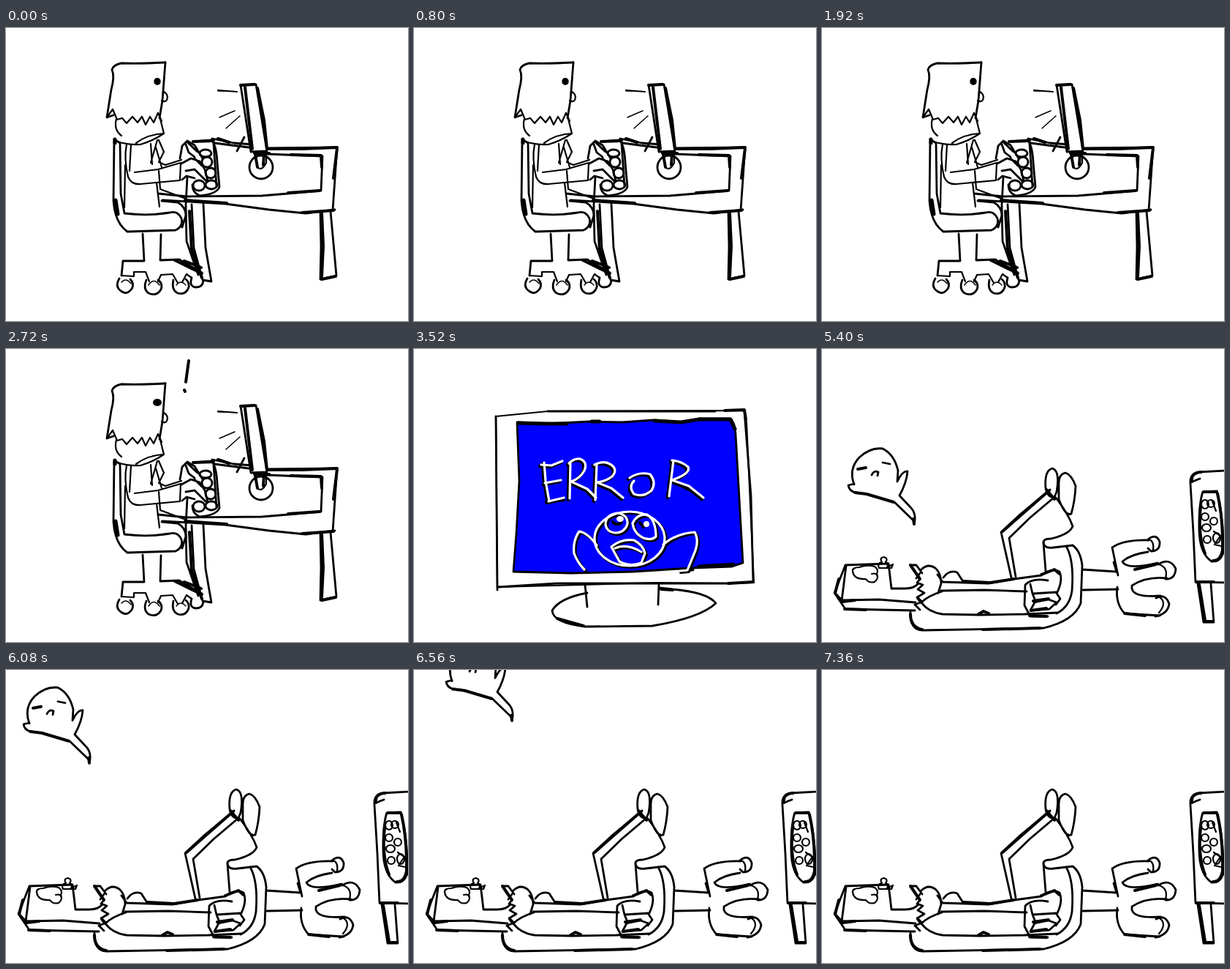
Animation, 550 px wide and 400 px high, one loop 7600 ms. Source, as an HTML page:

```html
<!DOCTYPE html>
<html lang="en">
<head>
<meta charset="utf-8">
<title>Error at the desk</title>
<style>
html, body { margin: 0; width: 100%; height: 100%; overflow: hidden; background: #fff; }
svg { display: block; width: 550px; height: 400px; }
.w1 { stroke-width: 1.5; }
.w2 { stroke-width: 2.2; }
.w4 { stroke-width: 4; }
.w5 { stroke-width: 5; }
.ink { fill: #000; stroke: none; }
.paper { fill: #fff; }
</style>
</head>
<body>
<svg viewBox="0 0 550 400" fill="none" stroke="#000" stroke-width="2.8" stroke-linecap="round" stroke-linejoin="round">
  <defs>
    <g id="letters">
      <path d="M178 155L180 180L185 208M174 158L188 159L203 153M179 183L201 179M184 208L205 203"/>
      <path d="M214 154L213 204M212 156Q219 149 227 150Q238 154 233 166Q227 177 215 181L237 191L249 203"/>
      <path d="M250 157L248 206M247 158Q258 152 268 157Q280 164 271 174Q262 181 250 182L270 190L286 203"/>
      <path d="M295 176Q308 167 323 171Q332 182 325 193Q314 203 301 198Q293 188 301 180"/>
      <path d="M355 152L349 201M353 152Q366 153 375 161Q379 170 353 179L376 187L396 203"/>
    </g>
    <g id="face">
      <ellipse cx="295" cy="259" rx="48" ry="37"/>
      <path d="M262 240Q262 226 278 224Q293 226 292 239Q288 251 275 251Q264 250 262 240Z"/>
      <path d="M299 238Q305 225 319 226Q331 234 331 256Q325 262 314 258Q301 252 299 238Z"/>
      <path d="M270 270Q283 259 301 261Q314 268 316 279L311 292Q295 298 281 290Z"/>
      <path d="M275 272Q291 265 311 277"/>
      <path d="M250 268Q238 251 226 249Q217 262 219 279Q224 292 233 301"/>
      <path d="M341 267Q358 252 384 250Q391 262 383 280L374 302L363 303"/>
    </g>
  </defs>

  <g id="desk">
    <!-- head -->
    <path d="M218 47Q182 49 158 48Q147 50 145 57Q149 66 144 84L138 122L147 119"/>
    <path d="M218 47Q216 73 214 99L210 123"/>
    <path class="w2" d="M138 122L146 111L152 125L159 123L165 130L173 121L180 129L186 121L191 132L197 121L202 129L208 116L213 127"/>
    <path class="w2" d="M216 87Q223 91 220 98Q218 102 213 99"/>
    <ellipse id="eye" class="ink" cx="207" cy="73" rx="4.7" ry="4.9"/>
    <path class="w2" d="M151 124Q147 139 158 147M211 124L216 144Q201 154 184 159Q168 160 152 155M216 144Q194 145 178 157"/>
    <!-- body -->
    <path class="w2" d="M165 159Q161 178 167 203Q171 214 184 213L238 208M171 159L169 195M163 187L162 245"/>
    <path class="w2" d="M176 197L208 193L239 184L238 208M207 153L198 184M198 158L200 186M209 153L216 169L209 183L218 187L240 180M205 163L213 190"/>
    <path class="w2" d="M206 211L210 244M209 195L211 220L246 233"/>
    <!-- chair -->
    <path d="M148 152L147 236Q149 266 166 278L232 276Q243 271 240 260Q235 249 224 252Q194 257 162 253L157 226L156 157L148 152"/>
    <path class="w5" d="M149 152V157M150 235L153 254"/>
    <path d="M213 236L235 238Q246 244 246 256L241 272"/>
    <path d="M187 281L189 318L160 318L158 338M212 282L211 317L237 316L268 334"/>
    <path class="w2" d="M158 338L175 339L175 333L191 333L196 346M208 346L212 337L228 336L235 348M241 347L247 336L254 341"/>
    <path class="w4" d="M231 317L268 335M244 318L267 327"/>
    <path d="M155 342Q149 352 156 358Q165 366 172 356Q176 349 170 343M192 344Q187 356 195 362Q206 367 212 357Q215 349 208 344M229 344Q226 358 235 362Q246 365 250 354Q251 347 246 343M254 341Q250 353 260 354Q269 354 270 345"/>
    <path class="w1" d="M158 347Q164 340 171 349M195 351Q202 340 210 351M233 351Q239 343 246 351"/>
    <!-- table -->
    <path d="M282 151L312 157L337 159M285 157L332 163M356 164L453 163L447 249"/>
    <path class="w4" d="M359 165L405 165L453 163M453 164L448 205M256 155L284 154M290 151L305 156"/>
    <path d="M357 172L433 175L431 222L386 226L350 229L247 230L208 226"/>
    <path class="w4" d="M390 173L431 174L432 190M386 225L429 222"/>
    <path d="M214 235L300 240L360 248L410 253L450 248"/>
    <path class="w4" d="M245 235L302 239M405 252L448 249"/>
    <path d="M248 204L246 241L247 291L263 337M254 241L257 300L269 344L281 346L273 300L270 240M430 250L431 298L430 343L452 338L444 250"/>
    <path class="w4" d="M251 250L254 302L268 341M432 252L434 298L432 339M432 343L451 339"/>
    <!-- screen -->
    <path class="paper" d="M321 78L342 77L357 168L335 169Z"/>
    <path class="w4" d="M321 78L340 77M327 81L337 165M344 82L353 126L357 165"/>
    <circle cx="349" cy="190" r="16"/>
    <path class="w4" d="M340 171H360M341 173L344 190M353 171L352 187"/>
    <path class="w2" d="M344 190Q350 196 356 184V172M290 85L316 87"/>
    <path class="w1" d="M292 122L313 113M301 137L320 120M290 86H302"/>
    <path d="M326 149L316 168"/>
    <!-- keys -->
    <path d="M258 155L281 153Q288 160 289 184L292 217Q288 227 265 229Q255 225 255 214M284 158L288 216"/>
    <ellipse cx="273" cy="171" rx="8" ry="5"/>
    <circle cx="275" cy="183" r="7"/>
    <circle cx="280" cy="198" r="7"/>
    <ellipse cx="264" cy="215" rx="8" ry="7"/>
    <ellipse cx="281" cy="214" rx="8" ry="6"/>
    <g id="handsA">
      <path d="M238 178L241 161L248 154L258 160L269 178M246 159L250 170L258 176M247 155L262 169"/>
      <path d="M240 185L253 178L265 182L272 193L276 209M246 195L258 193L267 202L274 209M241 207L247 202L258 205M258 178L268 188"/>
    </g>
    <g id="handsB">
      <path d="M238 178L243 166L251 159L264 163L277 175M247 163L254 172L267 179M251 160L267 168"/>
      <path d="M240 185L252 181L263 179L273 187L283 202M246 195L260 190L272 198L281 205M241 207L249 200L261 201"/>
    </g>
    <path id="shock" class="w4" d="M250 16L246 45M244 56L245 58"/>
  </g>

  <g id="error">
    <path class="w2" d="M112 92L183 85L452 84L455 101L465 319L435 320L330 319L114 325Z"/>
    <path d="M112 92L114 329M183 85L412 85M452 85L461 200L464 318M115 325L195 320L434 320"/>
    <path class="w4" d="M425 84L452 83L454 96M430 320L464 318"/>
    <path d="M141 100L183 102L240 99L285 100L327 97L368 100L390 95L433 95Q439 100 440 116L450 292L435 297L378 299L300 304L215 306L136 304L140 252L144 180Z" fill="#00f"/>
    <path class="w5" d="M143 101L182 102L209 102M243 99L254 99M330 98L365 100L390 96L433 96L439 109M364 302L381 301M390 297L437 294"/>
    <path d="M234 322L237 352M335 322L334 349M237 333Q199 340 189 357Q190 374 234 379L326 378Q392 367 413 347Q401 332 354 328L336 326"/>
    <path class="w4" d="M338 328L354 329M196 368L232 378"/>
    <use href="#letters" x="-2" y="2" stroke-width="4.5"/>
    <use href="#face" x="2" y="2" stroke-width="4"/>
    <path class="w4" d="M181 209L205 206M360 184L376 192M272 236Q276 242 284 237M309 237L314 243"/>
    <g stroke="#fff" stroke-width="3.2">
      <use href="#letters"/>
      <use href="#face"/>
    </g>
    <g fill="#fff" stroke="none">
      <ellipse cx="282" cy="232" rx="5" ry="4"/>
      <circle cx="318" cy="239" r="4"/>
    </g>
  </g>

  <g id="floor">
    <!-- head -->
    <path d="M32 295L91 293L95 327L114 327Q126 327 132 320M32 295L17 333L32 355L127 357M33 296L27 343L78 342L128 346M18 333L28 344"/>
    <path class="w4" d="M23 314L18 333M31 355L60 356M28 345L45 343"/>
    <path class="w2" d="M42 304Q41 298 51 298Q62 294 72 297Q78 301 75 307Q78 313 72 318Q64 320 60 314Q44 315 42 304M68 307Q75 305 76 311M78 299Q75 292 82 291Q78 285 85 284Q91 286 87 291Q92 292 89 298L97 294L95 299L79 299"/>
    <path d="M121 295L129 295L137 306M136 301Q145 292 155 299Q163 306 163 320L159 333M134 306L129 313"/>
    <path d="M121 295L134 314L130 319L138 322L131 328L140 333L130 339L137 345L127 349L134 356"/>
    <path class="w4" d="M121 295L134 314M131 340L136 346"/>
    <!-- body -->
    <path d="M158 308L165 318L228 320L263 314L300 309Q315 298 325 304Q330 315 322 332M166 312Q174 301 185 305L192 316M163 330L222 329L280 331M164 331Q145 337 136 346Q145 359 165 362L216 363L277 362L322 360"/>
    <path class="w4" d="M193 317L230 319L262 314M214 362L221 358L228 361M300 308L318 301L325 307"/>
    <path d="M278 322Q287 312 309 316M278 322L277 350L285 365L309 365M285 321L288 334L320 332M288 334L292 344L285 357L311 355L321 346L310 342L290 346M320 332L326 341L320 349"/>
    <path class="w4" d="M286 357L307 354M284 364L307 365M289 344L310 341"/>
    <!-- legs -->
    <path d="M259 312L245 250L272 225L312 192M265 311L256 258L285 230L317 203"/>
    <path class="w4" d="M247 249L272 227L311 193M307 192L318 205"/>
    <path d="M306 190Q304 166 315 163Q326 166 321 195L318 202Q309 204 306 190M324 183Q324 171 333 169Q341 171 347 187Q346 208 341 225Q333 229 324 205ZM320 203Q337 225 343 242Q339 253 313 259Q302 259 303 265L306 303"/>
    <!-- chair -->
    <path d="M303 263Q303 273 317 271L343 268Q354 276 356 296L354 347Q345 371 303 381L138 384Q120 384 121 359M335 271Q345 290 342 330Q339 352 321 361M356 301L403 304M357 329L405 328"/>
    <path class="w4" d="M121 362Q121 380 137 383M220 383L298 381"/>
    <path d="M405 309L397 271Q413 260 447 261M446 277Q423 280 411 290Q416 302 459 292M403 304L399 291M472 313Q444 310 424 323Q421 340 463 337M404 325Q401 347 414 361L462 364"/>
    <path d="M446 260Q457 251 462 263Q463 276 450 276L446 272M460 294Q476 284 484 300Q483 315 470 314M457 340Q470 333 475 348Q473 362 456 365"/>
    <path class="w2" d="M447 260Q455 262 453 275M461 294Q474 298 470 313M461 338Q473 346 461 360"/>
    <path class="w4" d="M428 301L457 294M414 361L442 364"/>
    <!-- table -->
    <path d="M552 166L516 168Q503 170 504 183L508 250L511 318L552 319M507 181L517 177M514 320L522 373L536 373L532 320"/>
    <path class="w4" d="M506 181Q504 169 519 168M512 318H536M524 372H535M516 321L524 370"/>
    <path d="M521 195L540 194Q549 225 549 278Q545 291 533 290Q515 278 516 240Q516 210 521 195Z"/>
    <path class="w4" d="M523 195H540M518 215Q514 255 524 279M541 197Q549 232 548 275Q545 290 535 289"/>
    <g class="w2">
      <ellipse cx="524" cy="212" rx="5" ry="6"/>
      <ellipse cx="532" cy="211" rx="5" ry="5"/>
      <ellipse cx="524" cy="229" rx="5" ry="5"/>
      <ellipse cx="526" cy="244" rx="6" ry="5"/>
      <ellipse cx="536" cy="235" rx="5" ry="5"/>
      <ellipse cx="527" cy="260" rx="5" ry="5"/>
      <ellipse cx="540" cy="258" rx="5" ry="7"/>
      <path d="M536 249L545 255L537 267L546 269M534 208L539 221"/>
    </g>
    <g id="ghost">
      <path d="M8 50Q0 29 15 13Q30 -1 47 1Q63 9 68 31L67 46Q74 31 81 32Q80 47 70 65L84 80Q94 89 90 104M8 49L0 51Q1 59 10 61L25 63L63 74L89 99"/>
      <path class="w4" d="M13 29L24 27M9 61L25 63L62 74M89 97L90 104"/>
      <path d="M47 20L57 22M32 37Q35 30 41 33L40 38"/>
    </g>
  </g>
</svg>
<script>
const LOOP = 7600, ERROR = 3520, FLOOR = 5080, GONE = 7360;
// time, left, top
const RISE = [
  [5080, 39, 187], [5400, 36, 135], [5840, 7, 63], [5880, 6, 56.5],
  [6080, 24, 23], [6400, 50, -17], [6640, 42, -44], [7320, 46, -102], [7360, 46, -106]
];
const $ = id => document.getElementById(id);
const show = (id, on) => { $(id).style.display = on ? "" : "none"; };
const mix = (a, b, k) => a + (b - a) * k;

function ghostAt(t) {
  const i = Math.max(1, RISE.findIndex(p => p[0] >= t));
  const [t0, x0, y0] = RISE[i - 1], [t1, x1, y1] = RISE[i];
  const k = (t - t0) / (t1 - t0);
  return [mix(x0, x1, (1 - Math.cos(Math.PI * k)) / 2), mix(y0, y1, k)];
}

function draw(t) {
  show("desk", t < ERROR);
  show("error", t >= ERROR && t < FLOOR);
  show("floor", t >= FLOOR);

  const odd = Math.floor(Math.min(t, 2960) / 80) % 2 === 1;
  show("handsA", !odd);
  show("handsB", odd);
  const alarmed = t >= 2480;
  show("shock", alarmed);
  $("eye").setAttribute("rx", alarmed ? 6 : 4.7);

  const rising = t >= FLOOR && t < GONE;
  show("ghost", rising);
  if (rising) {
    const [x, y] = ghostAt(Math.floor(t / 40) * 40);
    $("ghost").setAttribute("transform", `translate(${x.toFixed(1)} ${y.toFixed(1)})`);
  }
}

const start = performance.now();
function tick() {
  draw((performance.now() - start) % LOOP);
  requestAnimationFrame(tick);
}
tick();
</script>
</body>
</html>
```
